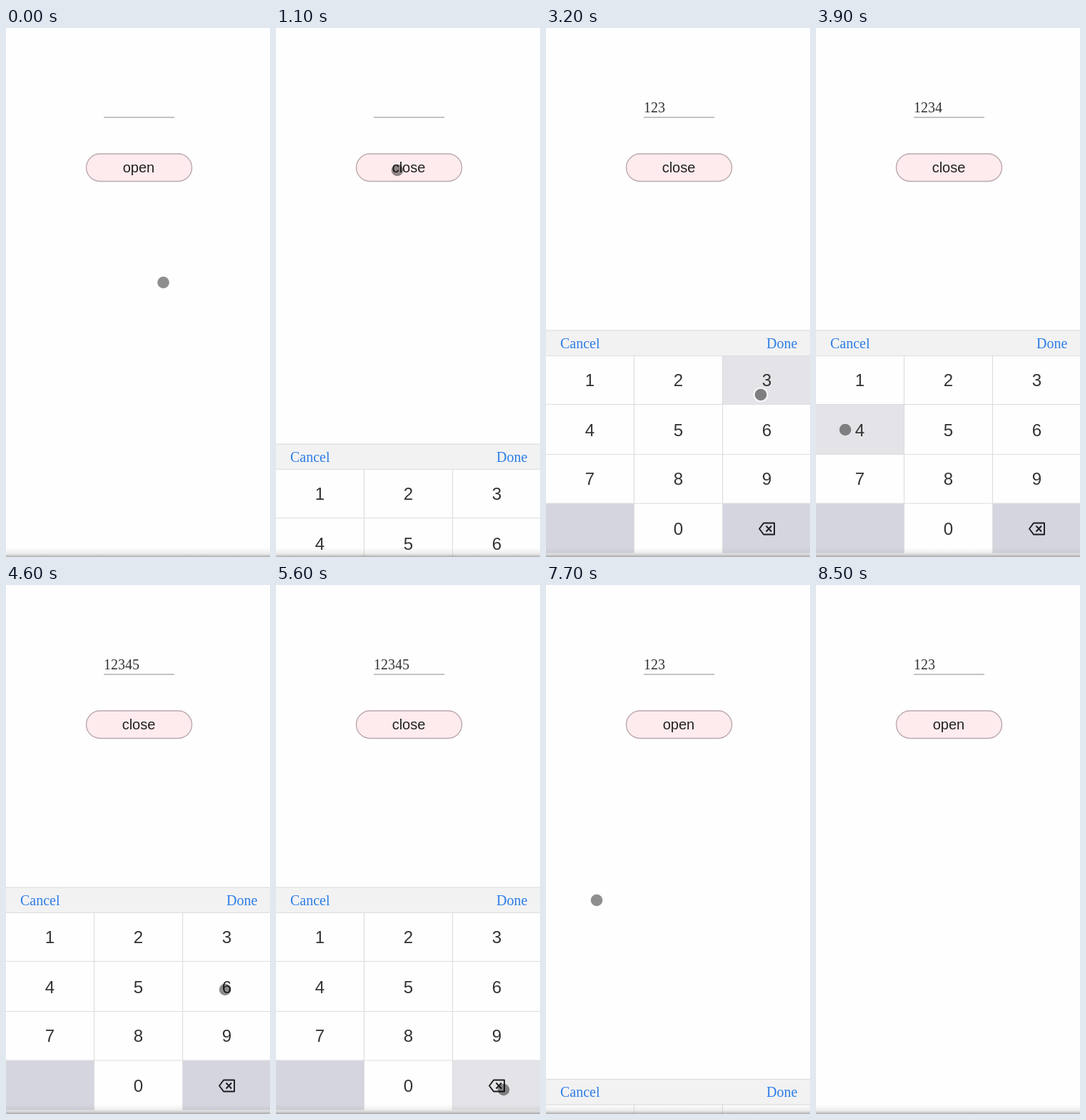
Recreate the animation shown at these times as an HTML page. Size 370 by 740 pixels, loop 9000 ms.

```html
<!DOCTYPE html>
<html lang="en">
<head>
<meta charset="utf-8">
<title>Number keyboard</title>
<style>
  html, body { margin: 0; width: 100%; height: 100%; overflow: hidden; background: #fefefe; }
  svg { display: block; width: 370px; height: 740px; }
  .sans { font-family: "Liberation Sans", Arial, sans-serif; text-anchor: middle; }
  .serif { font-family: "Liberation Serif", "Times New Roman", serif; font-size: 20px; }
  .digit { font-size: 24px; fill: #333; }
  .link { fill: #2c7de6; }
</style>
</head>
<body>
<svg viewBox="0 0 370 740">
  <defs>
    <linearGradient id="shade" x2="0" y2="1">
      <stop offset="0" stop-color="#888" stop-opacity="0"/>
      <stop offset=".65" stop-color="#888" stop-opacity=".16"/>
      <stop offset="1" stop-color="#777" stop-opacity=".6"/>
    </linearGradient>
    <radialGradient id="ripple">
      <stop offset=".45" stop-color="#fff" stop-opacity=".9"/>
      <stop offset=".6" stop-color="#eee" stop-opacity=".9"/>
      <stop offset=".76" stop-color="#999" stop-opacity=".8"/>
      <stop offset="1" stop-color="#bbb" stop-opacity="0"/>
    </radialGradient>
  </defs>
  <rect width="370" height="740" fill="#fefefe"/>
  <text id="value" class="serif" x="137" y="118" fill="#333"></text>
  <path d="M137 125H236" stroke="#8c8c8c" stroke-width="1.2"/>
  <rect x="112.5" y="176" width="148" height="38.5" rx="19.25" fill="#feebed" stroke="#bba9ae" stroke-width="1.4"/>
  <text id="label" class="sans" x="186" y="202" font-size="20" fill="#222">open</text>
  <g id="keyboard">
    <rect y="423" width="370" height="317" fill="#f2f2f3"/>
    <path d="M0 423H370" stroke="#d9d9da"/>
    <text class="serif link" x="20" y="448">Cancel</text>
    <text class="serif link" x="309" y="448">Done</text>
    <g id="keys"></g>
    <path d="M0 458.5H370M0 526.5H370M0 596.5H370M0 665H370M123.5 459V734M247.5 459V734" stroke="#dedee0" stroke-width="1.2" fill="none"/>
    <path d="M299 700.5L305 692.5H320V708.5H305ZM308.5 696.5L316 704.5M316 696.5L308.5 704.5" fill="none" stroke="#1c1c1e" stroke-width="1.9" stroke-linejoin="round"/>
  </g>
  <rect y="727" width="370" height="13" fill="url(#shade)"/>
  <circle id="ring" fill="url(#ripple)"/>
  <circle id="halo" r="9.5" fill="none" stroke="#fff" stroke-opacity=".75" stroke-width="2"/>
  <circle id="cursor" r="8.3" fill="#000" fill-opacity=".44"/>
</svg>
<script>
const LOOP = 9000, STEP = 100;
const $ = id => document.getElementById(id);
const clamp = v => Math.max(0, Math.min(1, v));
const ease = p => p * p * (3 - 2 * p);

const LABELS = ["1", "2", "3", "4", "5", "6", "7", "8", "9", "", "0", "del"];
const COLS = [0, 123.5, 247.5, 370], ROWS = [459, 526.5, 596.5, 665, 734.5];

// [time, key]
const TAPS = [
  [1000, "open"], [2200, "1"], [2600, "2"], [3200, "3"], [3800, "4"], [4300, "5"],
  [4900, "6"], [5500, "del"], [5900, "del"], [6400, "del"], [7500, "close"]
];

// [time, x, y]
const PATH = [
  [0, 220.5, 356], [500, 170, 199], [1300, 170, 199], [1700, 96, 470],
  [2000, 88.5, 486], [2250, 88.5, 486], [2450, 188, 500], [2600, 188, 500],
  [2800, 301, 513], [3300, 301, 513], [3600, 41, 562], [3900, 41, 562],
  [4150, 190, 566], [4350, 190, 566], [4600, 307, 566], [5000, 307, 566],
  [5300, 319, 706], [5700, 319, 706], [5800, 313, 706], [6700, 313, 706],
  [7200, 71, 441], [7700, 71, 441], [8100, -24, 420]
];

function add(parent, name, attrs, text = "") {
  const node = document.createElementNS("http://www.w3.org/2000/svg", name);
  for (const key in attrs) node.setAttribute(key, attrs[key]);
  node.textContent = text;
  return parent.appendChild(node);
}

const keys = LABELS.map((name, i) => {
  const col = i % 3, row = Math.floor(i / 3);
  const isDigit = /\d/.test(name);
  const base = isDigit ? "#fefefe" : "#d4d5de";
  const rect = add($("keys"), "rect", {
    x: COLS[col], y: ROWS[row], fill: base,
    width: COLS[col + 1] - COLS[col], height: ROWS[row + 1] - ROWS[row]
  });
  if (isDigit) add($("keys"), "text", {
    class: "sans digit", x: [61.5, 185.5, 309.5][col], y: [501, 570.5, 639, 708.5][row]
  }, name);
  return { name, base, rect };
});

function cursorAt(t) {
  const next = PATH.findIndex(p => p[0] > t);
  if (next < 0) return PATH[PATH.length - 1].slice(1);
  const a = PATH[next - 1], b = PATH[next];
  const p = ease((t - a[0]) / (b[0] - a[0]));
  return [a[1] + (b[1] - a[1]) * p, a[2] + (b[2] - a[2]) * p];
}

function valueAt(t) {
  return TAPS.filter(([time, key]) => time <= t && key.length !== 4 && key !== "close")
    .reduce((text, [, key]) => key === "del" ? text.slice(0, -1) : text + key, "");
}

function render(t) {
  const shown = ease(clamp((t - 900) / 400)) - ease(clamp((t - 7400) / 400));
  $("keyboard").setAttribute("transform", `translate(0 ${(1 - shown) * 318})`);
  $("keyboard").style.display = shown > 0 ? "" : "none";
  $("label").textContent = t >= 1000 && t < 7500 ? "close" : "open";
  $("value").textContent = valueAt(t);

  const pressed = TAPS.find(([time]) => t >= time && t < time + 200);
  for (const key of keys)
    key.rect.setAttribute("fill", key.name && pressed?.[1] === key.name ? "#e3e3e8" : key.base);

  const [x, y] = cursorAt(t);
  for (const id of ["cursor", "ring", "halo"]) {
    $(id).setAttribute("cx", x);
    $(id).setAttribute("cy", y);
  }
  const coming = TAPS.find(([time]) => t >= time - 200 && t < time);
  $("ring").setAttribute("r", coming ? 21 - (coming[0] - 100 - t) * 0.06 : 0);
  $("halo").style.display = pressed && t < pressed[0] + 100 ? "" : "none";
}

const start = performance.now();
function tick() {
  const t = (performance.now() - start) % LOOP;
  render(Math.floor(t / STEP) * STEP);
  requestAnimationFrame(tick);
}
tick();
</script>
</body>
</html>
```
